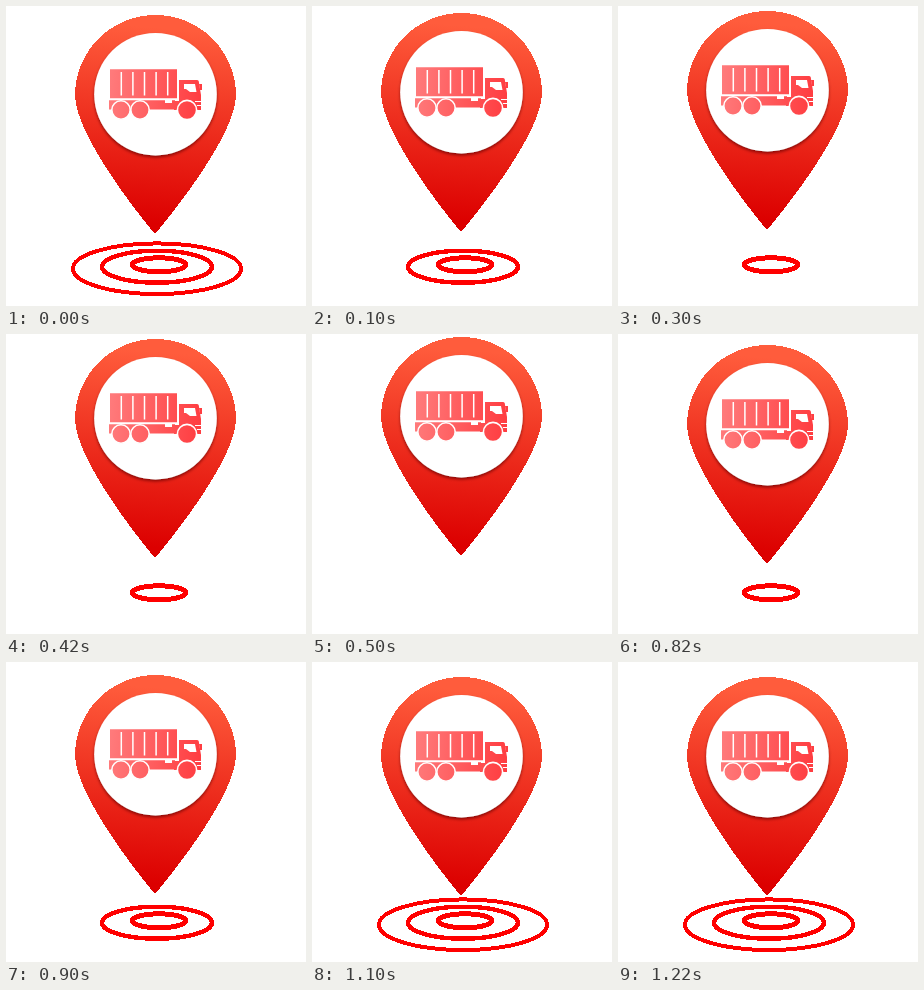
An HTML page for the animation above (1.3 s loop, 300 px wide and 300 px high).

```html
<!DOCTYPE html>
<html>
<head>
<meta charset="utf-8">
<style>
  html, body { margin: 0; width: 100%; height: 100%; overflow: hidden; background: #fff; }
  svg { display: block; width: 300px; height: 300px; }
</style>
</head>
<body>
<svg viewBox="0 0 300 300">
  <defs>
    <linearGradient id="pinFill" x1=".53" y1="0" x2=".47" y2="1">
      <stop offset=".06" stop-color="#ff5c3c"/>
      <stop offset=".95" stop-color="#dc0000"/>
    </linearGradient>
    <linearGradient id="truckFill" gradientUnits="userSpaceOnUse" x1="104" y1="84" x2="196" y2="92">
      <stop offset="0" stop-color="#ff7a7b"/>
      <stop offset=".5" stop-color="#ff5b5d"/>
      <stop offset="1" stop-color="#ff3c40"/>
    </linearGradient>
    <filter id="shadow" x="-10%" y="-10%" width="120%" height="120%">
      <feDropShadow dx="0" dy="2" stdDeviation="1.5" flood-color="#600" flood-opacity=".7"/>
    </filter>
  </defs>

  <g id="rings" fill="none" stroke="#f00" shape-rendering="crispEdges">
    <ellipse cx="153" cy="258.8" rx="26.7" ry="7" stroke-width="5"/>
    <ellipse cx="151" cy="260.7" rx="55" ry="16" stroke-width="4.4"/>
    <ellipse cx="151" cy="262.7" rx="84" ry="25.3" stroke-width="4"/>
  </g>

  <g id="pin">
    <path fill="url(#pinFill)" shape-rendering="crispEdges"
      d="M149 228C133 209 70 130 69 89.5A80.5 80.5 0 0 1 230 89.5C229 130 165 209 149 228Z"/>
    <circle cx="149.5" cy="88.2" r="61.3" fill="#fff" filter="url(#shadow)"/>
    <g fill="url(#truckFill)">
      <path d="M104 63.2H171V92.3H104Z"/>
      <path d="M103 94.3H169V103.5H103Z"/>
      <path d="M173 74H191Q193 74 193 77L195 89V104H168V95H173Z"/>
      <path d="M193 78H196V84H194Z"/>
      <path fill="#fff" d="M178 78H189L190.5 86H184L180 83H178Z"/>
      <path fill="#fff" d="M159 94H166V97H159Z"/>
      <path stroke="#fff" stroke-width="1.5" d="M115.3 66V89.5M126.9 66V89.5M138.5 66V89.5M150.1 66V89.5M161.7 66V89.5"/>
      <path stroke="#fff" d="M189 95.5H195M191 99.5H195"/>
      <g stroke="#fff" stroke-width="1.6">
        <circle cx="115" cy="104" r="9.2"/>
        <circle cx="134" cy="104" r="9.2"/>
        <circle cx="181" cy="104" r="9.6"/>
      </g>
    </g>
  </g>
</svg>
<script>
  const pin = document.getElementById('pin');
  const rings = [...document.getElementById('rings').children];
  const LOOP = 1300, STEP = 200, STEPS = 7;

  function draw(now) {
    // The first pose is split across the loop seam.
    const step = Math.floor((now % LOOP + 100) / STEP) % STEPS;
    const lift = step < 4 ? -2 * step : 2 * (step - 3);
    const visible = Math.abs(3 - step);
    pin.setAttribute('transform', `translate(0 ${lift})`);
    rings.forEach((ring, i) => ring.setAttribute('visibility', i < visible ? 'visible' : 'hidden'));
  }

  const start = performance.now();
  function tick() {
    draw(performance.now() - start);
    requestAnimationFrame(tick);
  }
  tick();
</script>
</body>
</html>
```
